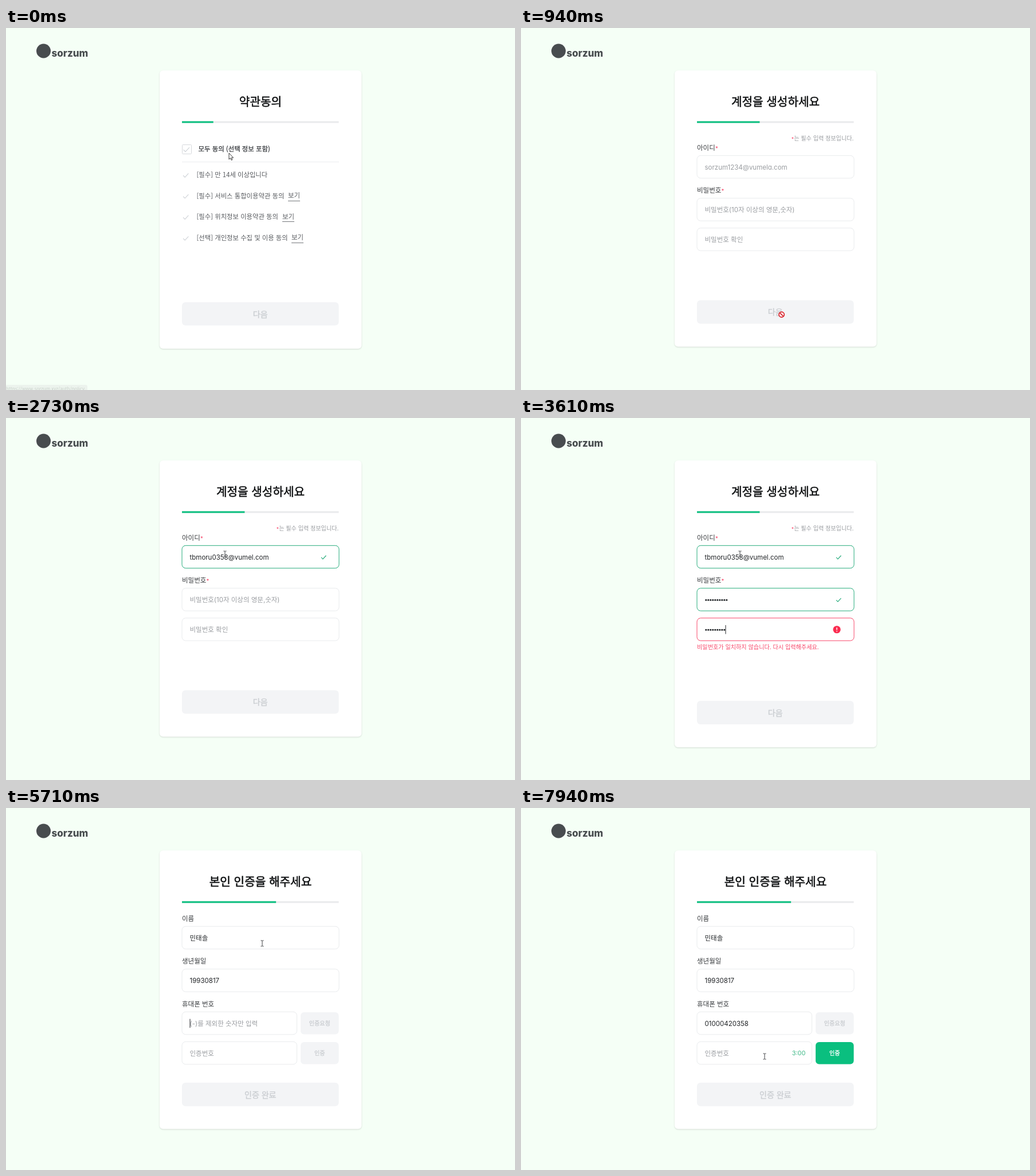
Recreate the animation shown at these times as an HTML page. Size 888 by 631 pixels, loop 8000 ms.

```html
<!DOCTYPE html>
<html lang="ko">
<head>
<meta charset="utf-8">
<title>회원가입</title>
<style>
  html, body { margin: 0; width: 100%; height: 100%; overflow: hidden; background: #f5fff6; }
  svg { display: block; width: 888px; height: 631px; }
  text { font-family: "Noto Sans CJK KR", "Noto Sans CJK", "Noto Sans", sans-serif; white-space: pre; }
  text.mix { font-family: Inter, "Noto Sans CJK KR", "Noto Sans CJK", sans-serif; font-feature-settings: "cv11"; }
  .card { fill: #fff; filter: drop-shadow(0 1.5px 1.3px rgba(0, 0, 0, .14)); }
</style>
</head>
<body>
<svg id="stage" viewBox="0 0 888 631"></svg>
<script>
const LOOP = 8000;
const GREEN = '#0abf7f', VALID = '#27ac7c', RED = '#f8486a', GREY = '#f3f4f6';
const INK = '#222528', SOFT = '#595c60', HINT = '#9a9da1', LINE = '#e9ebed';
const EMAIL = 'tbmoru0358@vumel.com', PHONE = '01000420358', BIRTH = '19930817';
const NAME = ['', 'ㅁ', '미', '민', '민ㅌ', '민태', '민태ㅅ', '민태소', '민태솔'];
const GROW = 18.5; // height of one error line

const stage = document.getElementById('stage');
const pen = document.createElement('canvas').getContext('2d');
let zones = []; // hit areas that choose the pointer shape

const clamp = v => Math.max(0, Math.min(1, v));
const fade = (t, from, span = 70) => clamp((t - from) / span);
const within = (t, ...spans) => spans.some(([a, b]) => t >= a && t < b);
// First key at `from`, last key at `to`.
const typed = (t, from, to, n) =>
  t < from ? 0 : Math.min(n, 1 + Math.floor((t - from) / (to - from) * (n - 1) + 1e-6));

const rect = (x, y, w, h, r, attrs) =>
  `<rect x="${x}" y="${y}" width="${w}" height="${h}" rx="${r}" ${attrs}/>`;
const path = (d, attrs) => `<path d="${d}" ${attrs}/>`;

// cy is the optical middle of the line; bold is an outline that thickens the strokes.
function text(s, x, cy, size, color, { bold = 0, anchor = 'start', mix = false } = {}) {
  const stroke = bold ? `stroke="${color}" stroke-width="${bold}"` : '';
  return `<text class="${mix ? 'mix' : ''}" x="${x}" y="${(cy + size * .37).toFixed(2)}" ` +
    `font-size="${size}" fill="${color}" text-anchor="${anchor}" ${stroke}>${s}</text>`;
}

function textWidth(s) {
  pen.font = '11.5px Inter, "Noto Sans CJK KR", "Noto Sans CJK", sans-serif';
  return pen.measureText(s).width;
}

const tick = (x, y, color, k = 1) =>
  path(`M${x - 5 * k} ${y + .3}l${3.5 * k} ${3.6 * k}l${7 * k} ${-7.6 * k}`,
    `fill="none" stroke="${color}" stroke-width="1.15"`);

function button(label, x, y, w, h, on, size = 14) {
  zones.push({ x, y, w, h, kind: on > .5 ? 'hand' : 'blocked' });
  const opt = { bold: .35, anchor: 'middle' };
  const cx = x + w / 2, cy = y + h / 2 + .3;
  return rect(x, y, w, h, 6, `fill="${GREY}"`) + text(label, cx, cy, size, '#cbced2', opt) +
    (on ? `<g opacity="${on}">${rect(x, y, w, h, 6, `fill="${GREEN}"`)}${text(label, cx, cy, size, '#fff', opt)}</g>` : '');
}

function field(y, { hint, value = '', dots = 0, state = '', caret = false, w = 274 }) {
  const x = 307, h = 39.5, cy = y + h / 2 + .6;
  zones.push({ x, y, w, h, kind: 'beam' });
  const border = state === 'ok' ? VALID : state === 'bad' ? RED : LINE;
  let out = rect(x, y, w, h, 6.5, `fill="#fff" stroke="${border}"`);
  if (dots) {
    for (let i = 0; i < dots; i++) out += `<circle cx="${322.8 + i * 4}" cy="${cy + .2}" r="1.55" fill="${INK}"/>`;
  } else {
    out += text(value || hint, 320.5, cy, 11.5, value ? INK : HINT, { mix: true });
  }
  if (caret) {
    const cx = 320.5 + (dots ? dots * 4 : textWidth(value));
    out += rect(cx, cy - 8, 1, 15.5, 0, `fill="${INK}"`);
  }
  if (state === 'ok') out += tick(554, cy, VALID, .8);
  if (state === 'bad') {
    out += `<circle cx="551" cy="${cy - .3}" r="6.6" fill="#fb2c50"/>` +
      path(`M551 ${cy - 3.9}v4.4m0 1.4v1.5`, 'stroke="#fff" stroke-width="1.5"');
  }
  return out;
}

const star = `<tspan dy="2" fill="${RED}">*</tspan>`;
const label = (s, cy) => text(s, 307, cy + .5, 11.5, '#36393c');
const needed = (s, cy) => label(s + star, cy);
const error = (s, cy) => text(s, 307, cy + .4, 10.15, RED);

function frame(title, bottom, share) {
  return rect(268, 74, 352.3, bottom - 74, 6, 'class="card"') +
    text(title, 444, 128.9, 20.2, '#0d0f10', { bold: .5, anchor: 'middle' }) +
    rect(307, 162.5, 273.5, 3, 0, 'fill="#e9eaec"') +
    rect(307, 162.5, 273.5 * share, 3, 0, `fill="${GREEN}"`);
}

function terms(t) {
  const on = fade(t, 130);
  const color = on > .5 ? GREEN : '#cfd3d7';
  const rows = [
    ['[필수] 만 14세 이상입니다', 0],
    ['[필수] 서비스 통합이용약관 동의', 492],
    ['[필수] 위치정보 이용약관 동의', 482],
    ['[선택] 개인정보 수집 및 이용 동의', 498]
  ];
  let out = frame('약관동의', 559, .2) +
    rect(307.5, 203.5, 16, 16, 1, 'fill="#fff" stroke="#d6d9dc"') + tick(314.5, 211.8, color) +
    text('모두 동의 (선택 정보 포함)', 335.5, 210.9, 11.4, '#33363a', { bold: .25 }) +
    rect(307, 233, 274, 1, 0, 'fill="#ebecee"');
  rows.forEach(([s, link], i) => {
    const cy = 255.9 + i * 36.6;
    out += tick(313.5, cy + .8, color, .88) + text(s, 332.5, cy, 11.35, SOFT);
    if (link) out += text('보기', link, cy - .5, 11.4, SOFT) + rect(link, Math.round(cy + 8), 21, 1, 0, 'fill="#75787c"');
  });
  return out + button('다음', 307, 478, 273.5, 40.5, on);
}

function account(t) {
  const keys = typed(t, 1700, 2440, EMAIL.length);
  const pass = typed(t, 2870, 3200, 10);
  const again = typed(t, 3290, 3610, 9) + (t >= 3750 ? 1 : 0);
  const judge = (n, full) => !n ? '' : n < full ? 'bad' : 'ok';
  const states = [judge(keys, 19), judge(pass, 10), judge(again, 10)];
  const push = states.map(s => s === 'bad' ? GROW : 0);
  const a = push[0], b = a + push[1], c = b + push[2];
  let out = frame('계정을 생성하세요', 555.5 + c, .4) +
    text(`${star}<tspan dy="-2">는 필수 입력 정보입니다.</tspan>`, 580.3, 192.5, 10.1, HINT, { anchor: 'end' }) +
    needed('아이디', 208) +
    field(222.3, { hint: 'sorzum1234@vumela.com', value: EMAIL.slice(0, keys), state: states[0], caret: within(t, [1560, 2570]) }) +
    needed('비밀번호', 282.5 + a) +
    field(296.7 + a, { hint: '비밀번호(10자 이상의 영문,숫자)', dots: pass, state: states[1], caret: within(t, [2570, 2730], [2870, 3250]) }) +
    field(348.7 + b, { hint: '비밀번호 확인', dots: again, state: states[2], caret: within(t, [3250, 3900]) });
  if (a) out += error('이메일 형식이 올바르지 않습니다.', 272);
  if (push[1]) out += error('10자 이상의 영문, 숫자를 입력해주세요.', 346.5 + a);
  if (push[2]) out += error('비밀번호가 일치하지 않습니다. 다시 입력해주세요.', 398.4 + b);
  return out + button('다음', 307, 474.5 + c, 273.5, 41, fade(t, 3750));
}

function identity(t) {
  const sent = fade(t, 7860);
  const ready = fade(t, 6510) * (1 - sent);
  return frame('본인 인증을 해주세요', 559.5, .6) +
    label('이름', 192) +
    field(206.3, { hint: '이름', value: NAME[typed(t, 4600, 4870, 8)], caret: within(t, [4580, 4920]) }) +
    label('생년월일', 266.7) +
    field(280.8, { hint: '8자리  ex) 20000503', value: BIRTH.slice(0, typed(t, 5270, 5570, 8)), caret: within(t, [4920, 5110], [5270, 5710]) }) +
    label('휴대폰 번호', 341.3) +
    field(355.3, { hint: '(-)를 제외한 숫자만 입력', value: PHONE.slice(0, typed(t, 6050, 6510, 11)), w: 200.5, caret: within(t, [5710, 5880], [6050, 6680]) }) +
    button('인증요청', 514, 356, 66.5, 38.5, ready, 10) +
    field(407.3, { hint: '인증번호', w: 200.5 }) +
    (sent ? `<g opacity="${sent}">${text('3:00', 496.5, 427.3, 11, '#3fb987', { anchor: 'end', mix: true })}</g>` : '') +
    button('인증', 514, 408, 66.5, 38.5, sent, 10) +
    button('인증 완료', 307, 478.7, 273.5, 41, 0);
}

// time, x, y
const MOVES = [
  [0, 389, 218], [40, 389, 218], [130, 386, 214], [220, 386, 214], [620, 454, 497], [770, 454.6, 499.5],
  [950, 454.6, 499.5], [1500, 382, 237],
  [3760, 382, 237], [3980, 451, 497], [4130, 451, 497], [4320, 451, 237], [4360, 451, 237], [4440, 447, 236],
  [6650, 447, 236], [6790, 590, 412], [6890, 560, 379],
  [7390, 560, 379], [7640, 426, 437], [7720, 425, 433]
];

function pointerAt(t) {
  let i = MOVES.length - 1;
  while (MOVES[i][0] > t) i--;
  const [t0, x0, y0] = MOVES[i], [t1, x1, y1] = MOVES[i + 1] || [LOOP, x0, y0];
  const p = (t - t0) / (t1 - t0), e = p * p * (3 - 2 * p);
  return [x0 + (x1 - x0) * e, y0 + (y1 - y0) * e];
}

const POINTERS = {
  arrow: path('M0 0V11L2.5 8.7L4.2 12.4L5.9 11.7L4.3 8.1H7.6Z', 'fill="#fff" stroke="#222" stroke-width=".9"'),
  beam: path('M-2.5 -5H-.6L0 -4.4L.6 -5H2.5M0 -4.4V4.4M-2.5 5H-.6L0 4.4L.6 5H2.5', 'fill="none" stroke="#3c3f42" stroke-width="1"'),
  hand: path('M-1 0Q0 -1 1 0V4.5L6 5.8Q7 6.2 6.8 8L6 12H0L-3.8 7.6Q-3.6 6 -1 7.6Z', 'fill="#fff" stroke="#222" stroke-width=".9"'),
  blocked: '<circle r="4.6" fill="#fff" stroke="#d9222a" stroke-width="1.7"/>' +
    path('M-3.2 -3.2L3.2 3.2', 'stroke="#d9222a" stroke-width="1.7"')
};

function pointer(t) {
  const [x, y] = pointerAt(t);
  const hit = zones.find(z => x >= z.x && x <= z.x + z.w && y >= z.y && y <= z.y + z.h);
  return `<g transform="translate(${x.toFixed(1)} ${y.toFixed(1)})">${POINTERS[hit ? hit.kind : 'arrow']}</g>`;
}

function statusBar(s, w, alpha) {
  return alpha <= 0 ? '' : `<g opacity="${alpha.toFixed(2)}">` +
    rect(-4, 622, w + 4, 14, 3, 'fill="#e9f0ea"') + text(s, 0, 629, 8, '#bcc3be') + '</g>';
}

const LOGO = '<circle cx="65.5" cy="40" r="12.5" fill="#484c4f"/>' +
  '<text class="mix" x="79.5" y="49.5" font-size="17" font-weight="800" fill="#484c4f">sorzum</text>';

function render(t) {
  zones = [];
  const scene = t < 940 ? terms : t < 4130 ? account : identity;
  return LOGO + scene(t) +
    statusBar('https://www.sorzum.xyz/auth/policy', 142, .75 * (1 - fade(t, 20, 120))) +
    statusBar('요청하는 중', 296, t < 4040 ? 0 : .75 * (1 - fade(t, 4340, 90))) +
    pointer(t);
}

let last = '';
const start = performance.now();
function loop() {
  const now = render((performance.now() - start) % LOOP);
  if (now !== last) stage.innerHTML = last = now;
  requestAnimationFrame(loop);
}
loop();
</script>
</body>
</html>
```
